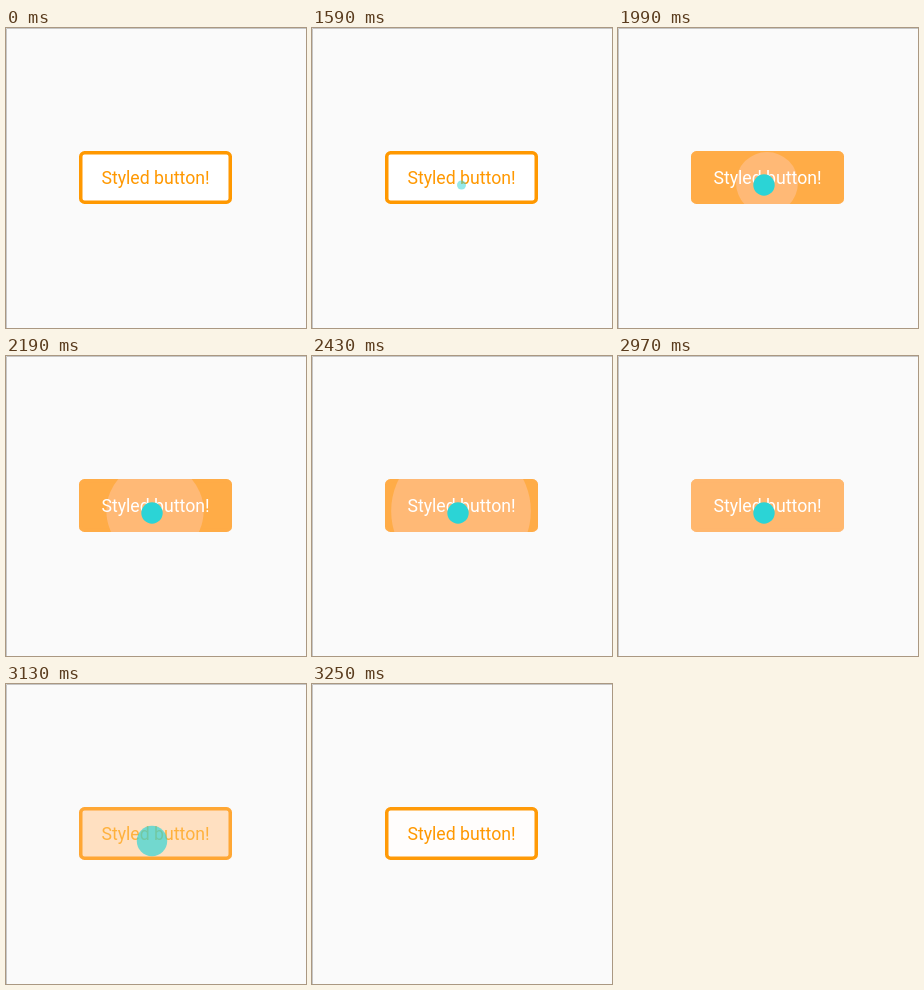
These frames come from a looping animation (300 px wide and 300 px high, 6140 ms). An HTML page:

```html
<!DOCTYPE html>
<html lang="en">
<head>
<meta charset="utf-8">
<title>Styled button</title>
<style>
  html, body { margin: 0; width: 100%; height: 100%; overflow: hidden; background: #fafafa; }
  svg { display: block; width: 100%; height: 100%; }
  text { font: 17.7px Roboto, sans-serif; text-anchor: middle; }
</style>
</head>
<body>
<svg viewBox="0 0 300 300">
  <clipPath id="shape"><rect x="73" y="123" width="153" height="53" rx="5.5"/></clipPath>
  <path d="M.5 300V.5H300" fill="none" stroke="#c6c6c6"/>
  <rect id="face" x="74.75" y="124.75" width="149.5" height="49.5" rx="3.8" stroke="#ff9800" stroke-width="3.5"/>
  <g id="ink" clip-path="url(#shape)" fill="#ffcdbe">
    <rect id="glow" x="73" y="123" width="153" height="53"/>
    <circle id="ripple" cx="149" cy="155" fill-opacity=".39"/>
  </g>
  <text id="label" x="149.5" y="156">Styled button!</text>
  <circle id="touch" cy="157" fill="#2bd4d6"/>
</svg>
<script>
const LOOP = 6140, PRESS = 1590, STEP = 40;
const $ = id => document.getElementById(id);
const ramp = (t, from, to) => Math.min(1, Math.max(0, (t - from) / (to - from)));
const set = (id, attrs) => {
  for (const k in attrs) $(id).setAttribute(k, attrs[k]);
};
// Mix from white (0) to orange (1)
const tint = p => `rgb(255,${Math.round(255 - 103 * p)},${Math.round(255 - 255 * p)})`;

function draw(time) {
  const t = PRESS + Math.floor((time - PRESS) / STEP) * STEP;
  const filled = ramp(t, PRESS, 1740) - ramp(t, 2958, 3158);
  set('face', { fill: tint(filled) });
  set('label', { fill: tint(1 - filled) });

  set('ink', { opacity: 1 - ramp(t, 2930, 3250) });
  set('glow', { 'fill-opacity': 0.375 * ramp(t, 1600, 1810) });
  set('ripple', { r: 84 * ramp(t, 1640, 2590) });

  const grow = ramp(t, PRESS, 1710), release = ramp(t, 2950, 3210);
  set('touch', {
    cx: 149.5 - 3.5 * grow,
    r: 4.5 + 6.2 * grow + 7.3 * release,
    opacity: t < PRESS ? 0 : (0.5 + 0.5 * grow) * (1 - ramp(t, 3060, 3210))
  });
}

let start;
function tick(now) {
  start ??= now;
  draw((now - start) % LOOP);
  requestAnimationFrame(tick);
}
draw(0);
requestAnimationFrame(tick);
</script>
</body>
</html>
```
